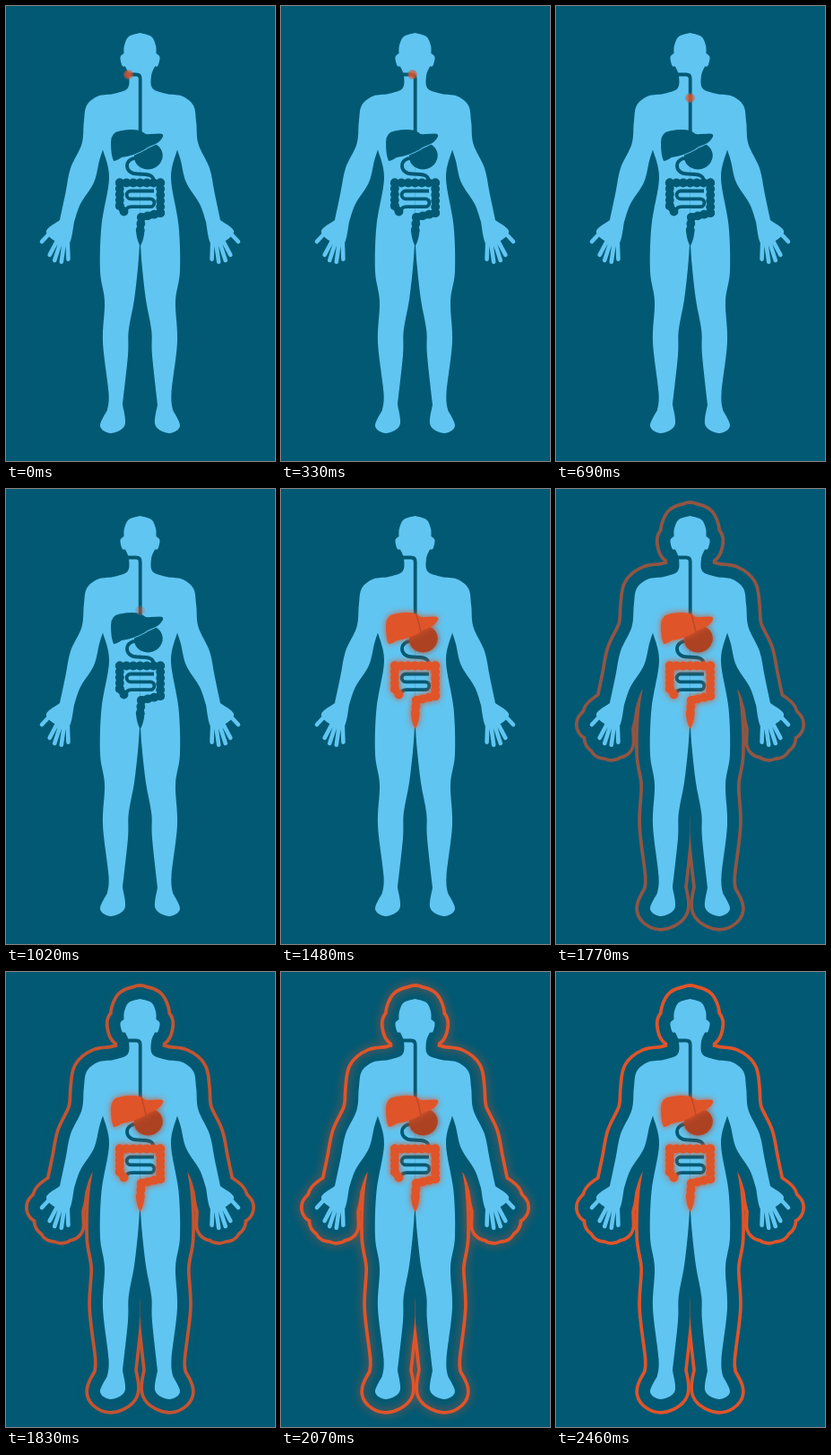
Animation, 300 px wide and 508 px high, one loop 3130 ms. Source, as an HTML page with a canvas:

```html
<!DOCTYPE html>
<html lang="en">
<head>
<meta charset="utf-8">
<title>Digestive system</title>
<style>
  html, body { margin: 0; width: 100%; height: 100%; overflow: hidden; background: #025973; }
  canvas { display: block; width: 300px; height: 508px; }
</style>
</head>
<body>
<canvas id="stage" width="300" height="508"></canvas>
<script>
const W = 300, H = 508, LOOP = 3130;
const DARK = '#025973', SKIN = '#60c5f1', ORANGE = '#e05429', RUST = '#ad4222';
const LIVER_AT = 1140, STOMACH_AT = 1310, COLON_AT = 1480, RING_AT = 1650;
const ctx = document.getElementById('stage').getContext('2d');
const clamp = (v, a = 0, b = 1) => Math.min(b, Math.max(a, v));

function layer(paint) {
  const c = document.createElement('canvas');
  c.width = W; c.height = H;
  paint(c.getContext('2d'));
  return c;
}

// Smooth curves through key points; consecutive parts meet in corners.
function spline(...parts) {
  const path = new Path2D();
  path.moveTo(...parts[0][0]);
  for (const p of parts) {
    for (let i = 0; i < p.length - 1; i++) {
      const a = p[i - 1] || p[i], b = p[i], c = p[i + 1], d = p[i + 2] || c;
      const bend = (u, v, k, s) => v[k] + s * (u[1][k] - u[0][k]) / 6;
      path.bezierCurveTo(bend([a, c], b, 0, 1), bend([a, c], b, 1, 1),
        bend([b, d], c, 0, -1), bend([b, d], c, 1, -1), ...c);
    }
  }
  path.closePath();
  return path;
}

const ear = [131.5, 53], jaw = [133, 67.5], wrist = [60, 239], cuff = [76, 241],
  armpit = [108, 160.5], ankle = [113, 451], heel = [130, 445];
const half = spline(
  [[150, 30], [137, 34], [132, 44], ear],
  [ear, [127.5, 57], [129.5, 66.5], jaw],
  [jaw, [137, 78], [135.5, 92], [120, 98], [103, 100.5], [90, 111], [86.8, 130], [84.5, 154], [72, 181], [66.5, 208], wrist],
  [wrist, [45, 251], [54, 262], [70, 266], cuff],
  [cuff, [83, 221], [98, 197], [104, 173], armpit],
  [armpit, [115, 192], [106.5, 245], [105, 296], [110, 330], [108, 375], [114.5, 432], ankle],
  [ankle, [105, 469], [117, 477], [132.5, 468], heel],
  [heel, [136, 390], [136.8, 362], [143, 328], [147.3, 290], [149.5, 258]]
);

// Thumb, then four fingers fanning out of the palm.
const fingers = new Path2D('M54 248 L40 263');
for (let i = 0; i < 4; i++) {
  const a = (10 * i - 28) * Math.PI / 180, len = 43.5 + 4 * Math.sin(Math.PI * i / 3);
  const reach = r => [68 + r * Math.sin(a), 241.5 + r * Math.cos(a)];
  fingers.moveTo(...reach(15));
  fingers.lineTo(...reach(len - 2.3));
}

// Both halves, optionally grown by a margin.
function drawBody(g, color, grow = 0) {
  g.fillStyle = g.strokeStyle = color;
  g.lineJoin = g.lineCap = 'round';
  for (const side of [1, -1]) {
    g.save();
    if (side < 0) { g.translate(299, 0); g.scale(-1, 1); }
    g.fill(half);
    if (grow) { g.lineWidth = 2 * grow; g.stroke(half); }
    g.lineWidth = 4.6 + 2 * grow;
    g.stroke(fingers);
    g.restore();
  }
}

const ring = layer(g => {
  drawBody(g, ORANGE, 16.7);
  g.globalCompositeOperation = 'destination-out';
  drawBody(g, '#000', 13);
});

const gullet = new Path2D('M134 76.5 H145 Q149.7 76.5 149.7 81 V142');
const duodenum = new Path2D('M147 170 C132 168 130 187.5 147 187.5 C160 187.5 165 189 165 197');
const liver = new Path2D('M117 152 Q117 141 127 139.5 Q146 136 153 141 Q156 144 160 143 L172 142.5 ' +
  'Q178 143 173 149 C168 156 160 155 155 160 Q143 167 129 169 Q123 173 120 173 Q117 167 117 152 Z');
const stomachTop = new Path2D('M151 140 Q154 150 156 160');
const stomach = new Path2D();
stomach.ellipse(158.8, 167.5, 16, 14.8, -0.3, 0, 7);

// Three rows joined by half circles on alternating sides.
const smallGut = new Path2D('M165 206.5 H139');
for (let i = 0; i < 2; i++) {
  const y = 206.5 + 8.8 * (i + 0.5);
  smallGut.arc(i ? 161 : 139, y, 4.4, -Math.PI / 2, Math.PI / 2, !i);
}
smallGut.lineTo(140, 224.1);
smallGut.quadraticCurveTo(134, 224.1, 134, 229);

const colonLine = [[131.5, 229.5], [126.8, 223], [126.8, 197.5], [172.2, 197.5], [172.2, 231], [151, 236], [149.7, 250]];

// A tube with evenly spaced bulges and a tapered end.
function drawColon(g, color) {
  g.fillStyle = g.strokeStyle = color;
  g.lineWidth = 7.6;
  g.lineJoin = 'round';
  g.beginPath();
  colonLine.forEach(p => g.lineTo(...p));
  g.stroke();
  colonLine.slice(1).forEach(([x, y], i) => {
    const [x0, y0] = colonLine[i];
    const n = Math.max(1, Math.round(Math.hypot(x - x0, y - y0) / 7));
    for (let k = 0; k <= n; k++) {
      g.beginPath();
      g.arc(x0 + (x - x0) * k / n, y0 + (y - y0) * k / n, 4.9, 0, 7);
      g.fill();
    }
  });
  g.fill(new Path2D('M145 250 H154.5 Q154 260 150.4 267 H149 Q145.5 260 145 250 Z'));
}
const darkColon = layer(g => drawColon(g, DARK));
const litColon = layer(g => drawColon(g, ORANGE));

function line(path, color, width) {
  ctx.strokeStyle = color;
  ctx.lineWidth = width;
  ctx.stroke(path);
}

// Paints with a soft halo when lit.
function glowing(lit, color, paint) {
  ctx.save();
  ctx.fillStyle = lit ? color : DARK;
  if (lit) { ctx.shadowColor = color; ctx.shadowBlur = 7; }
  paint();
  ctx.restore();
}

function drawOrgans(t) {
  const liverOn = t >= LIVER_AT, stomachOn = t >= STOMACH_AT, colonOn = t >= COLON_AT;
  ctx.lineCap = 'butt';
  line(duodenum, DARK, 3.8);
  line(smallGut, DARK, 3.8);
  glowing(stomachOn, RUST, () => ctx.fill(stomach));
  if (!liverOn) line(liver, SKIN, 2);
  line(gullet, DARK, 3.8);
  glowing(liverOn, ORANGE, () => ctx.fill(liver));
  if (liverOn) line(stomachTop, '#b84a28', 1.4);
  glowing(colonOn, ORANGE, () => ctx.drawImage(colonOn ? litColon : darkColon, 0, 0));
}

function drawBite(t) {
  if (t >= LIVER_AT) return;
  const turn = 430, r = 5.8;
  const x = 136.5 + 13 * clamp(t / turn);
  const y = 76.5 + 0.1 * Math.max(0, t - turn);
  const shade = ctx.createRadialGradient(x, y, 0, x, y, r);
  shade.addColorStop(0, 'rgba(224,84,41,.9)');
  shade.addColorStop(0.5, 'rgba(224,84,41,.78)');
  shade.addColorStop(0.85, 'rgba(215,85,50,.5)');
  shade.addColorStop(1, 'rgba(215,85,50,0)');
  ctx.globalAlpha = clamp((1170 - t) / 300);
  ctx.fillStyle = shade;
  ctx.beginPath();
  ctx.arc(x, y, r, 0, 7);
  ctx.fill();
  ctx.globalAlpha = 1;
}

function drawRing(t) {
  if (t <= RING_AT) return;
  const glow = Math.sin(Math.PI * clamp((t - 1800) / 660));
  ctx.save();
  ctx.globalAlpha = Math.sin(Math.PI / 2 * clamp((t - RING_AT) / 270));
  if (glow > 0.01) {
    ctx.shadowColor = `rgba(224,84,41,${0.8 * glow})`;
    ctx.shadowBlur = 11;
  }
  ctx.drawImage(ring, 0, 0);
  ctx.restore();
}

function draw(t) {
  ctx.fillStyle = DARK;
  ctx.fillRect(0, 0, W, H);
  drawRing(t);
  drawBody(ctx, SKIN);
  drawOrgans(t);
  drawBite(t);
}

const start = performance.now();
function tick() {
  draw((performance.now() - start) % LOOP);
  requestAnimationFrame(tick);
}
tick();
</script>
</body>
</html>
```
